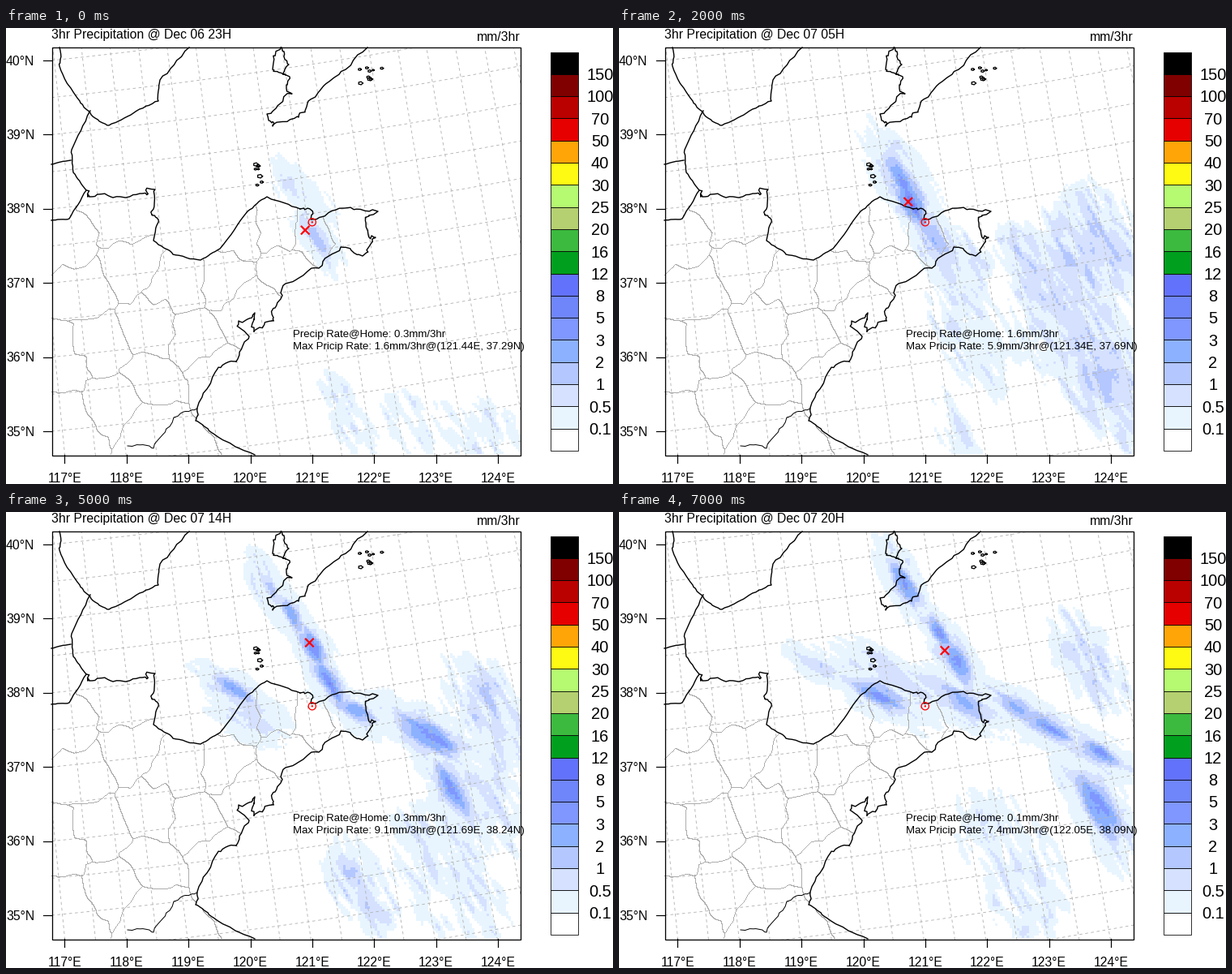
Animation of 749 by 562 pixels, one loop 8 s. Source, as a matplotlib script:

```python
import numpy as np
import matplotlib.pyplot as plt
from matplotlib.animation import FuncAnimation
from matplotlib.patches import Circle, Rectangle
from matplotlib.path import Path

W, H, DPI = 749, 562, 64
PT = 72 / DPI  # points per pixel
LEFT, TOP, RIGHT, BOTTOM = 56, 24, 635, 526
CELL = 3
plt.rcParams["font.family"] = "Liberation Sans"

SCALE = ["white", "#e8f5ff", "#d5e1ff", "#b4c7ff", "#8cb1ff", "#7f97ff",
         "#6f85fa", "#6372fa", "#00a01e", "#3cba3f", "#b4d070", "#b5fa70",
         "#fffa14", "#ffa508", "#e60000", "#bb0000", "#800000", "black"]
LIMITS = "0.1 0.5 1 2 3 5 8 12 16 20 25 30 40 50 70 100 150".split()
RGB = np.array([plt.matplotlib.colors.to_rgb(c) for c in SCALE])

# Rain cells: x, y, half length, peak colour level
RAIN_23 = [(350, 190, 38, 1.9), (380, 225, 45, 1.9), (384, 258, 38, 3.5),
           (410, 452, 32, 1.7), (430, 492, 42, 1.5), (500, 490, 44, 1.3),
           (560, 497, 42, 1.3), (605, 492, 40, 1.5)]
RAIN_05 = [(352, 192, 58, 4.8), (361, 216, 46, 6.4), (388, 262, 55, 3.7),
           (430, 280, 44, 1.9), (505, 295, 62, 2.9), (560, 285, 70, 2.9),
           (605, 265, 85, 2.9), (560, 370, 110, 2.7), (600, 430, 100, 2.7),
           (440, 380, 80, 2.1), (420, 495, 50, 1.9)]
RAIN_11 = [(332, 115, 26, 5.2), (376, 165, 44, 5.6), (396, 205, 50, 5.7),
           (430, 236, 42, 5.8), (475, 235, 50, 1.9), (410, 268, 38, 2.8),
           (492, 266, 50, 4.7), (535, 292, 66, 4.9), (575, 390, 105, 2.9),
           (588, 448, 55, 4.8), (608, 275, 85, 2.2), (436, 458, 72, 4.4),
           (262, 228, 34, 1.7), (318, 226, 34, 3.2)]
RAIN_14 = [(325, 95, 38, 3.2), (352, 125, 34, 4.8), (379, 168, 42, 5.6),
           (400, 212, 42, 5.5), (432, 246, 42, 4.7), (522, 276, 60, 5.7),
           (552, 342, 54, 5.2), (595, 245, 80, 2.6), (602, 340, 85, 2.1),
           (280, 217, 38, 4.8), (300, 250, 62, 2.5), (438, 462, 66, 2.5),
           (545, 450, 95, 1.8)]
RAIN_17 = [(345, 92, 46, 5), (386, 150, 46, 5.7), (418, 212, 48, 4.5),
           (536, 284, 54, 5.2), (578, 350, 58, 5.6), (612, 405, 50, 5.8),
           (600, 195, 55, 2.6), (530, 207, 40, 1.5), (280, 195, 40, 2.7),
           (308, 240, 48, 4), (330, 255, 68, 2.3), (430, 425, 100, 1.4),
           (510, 460, 85, 1.4)]
RAIN_20 = [(353, 88, 44, 5.3), (395, 150, 34, 5.4), (416, 184, 46, 5.5),
           (250, 192, 36, 3.1), (322, 226, 52, 5.3), (335, 203, 52, 3.1),
           (425, 236, 54, 4.2), (492, 242, 44, 4.8), (530, 266, 46, 5.3),
           (592, 296, 42, 5.1), (592, 362, 64, 5.7), (582, 185, 72, 2.5),
           (450, 375, 46, 1.8), (490, 440, 95, 1.7)]

# Time label, rain at home, peak rain, peak longitude and latitude
STEPS = [("06 23H", 0.3, 1.6, 121.44, 37.29),
         ("07 02H", 1.1, 3.7, 121.38, 37.52),
         ("07 05H", 1.6, 5.9, 121.34, 37.69),
         ("07 08H", 1.4, 8.2, 121.62, 37.64),
         ("07 11H", 0.8, 11.5, 121.90, 37.46),
         ("07 14H", 0.3, 9.1, 121.69, 38.24),
         ("07 17H", 0.2, 6.8, 121.83, 38.25),
         ("07 20H", 0.1, 7.4, 122.05, 38.09)]

# Coast corners; fine detail is added by ragged()
RIVER = [(56, 237), (78, 235), (99, 200)]
DELTA = [(99, 200), (103, 208), (132, 209), (168, 204), (184, 199), (180, 230)]
LAIZHOU = [(180, 230), (188, 236), (182, 262), (206, 279), (240, 286),
           (264, 272), (298, 226), (322, 208), (363, 223)]
CAPE = [(363, 223), (376, 236), (418, 222), (459, 226), (444, 240),
        (456, 258), (440, 281), (413, 270), (386, 296), (345, 315),
        (332, 345), (328, 361), (306, 374)]
BAY = [(306, 374), (307, 351), (287, 361), (300, 380), (284, 411)]
SOUTH = [(284, 411), (261, 420), (236, 468), (234, 484), (256, 500),
         (307, 526)]
BOHAI = [(66, 24), (66, 47), (91, 90), (107, 109), (127, 120), (157, 105),
         (188, 90), (190, 64), (226, 24)]
WEST = [(104, 102), (81, 150), (83, 178), (99, 200)]
LIAODONG = [(339, 24), (329, 51), (350, 60), (353, 81), (322, 106),
            (329, 121), (361, 110), (373, 90), (405, 61), (446, 24)]
STRAIT = [(340, 24), (349, 45), (345, 58)]
EDGE = [(56, 168), (80, 163)]
PROVINCE = [(236, 469), (207, 480), (182, 518), (150, 515)]
MAINLAND = [(RIVER, .8), (DELTA, 3), (LAIZHOU, .8), (CAPE, 2.6), (BAY, 2.4),
            (SOUTH, 1.8)]
OTHERS = [(BOHAI, 1.2), (WEST, .8), (LIAODONG, 2.4), (STRAIT, 2), (EDGE, .6)]

# Island groups: x, y, spread in x and y, count
ISLANDS = [(312, 178, 6, 16, 8), (450, 58, 14, 11, 9)]

# District centres
TOWNS = [(75, 270), (140, 240), (90, 318), (150, 288), (215, 315), (75, 410),
         (110, 395), (270, 307), (288, 256), (335, 250), (345, 295),
         (380, 255), (418, 250), (228, 385), (185, 372), (255, 430),
         (182, 432), (300, 345), (130, 460), (80, 490), (180, 490)]


def project(lon, lat):
    """Conic projection to stage pixels."""
    r = 6673.7 + 90.96 * (40 - lat)
    a = 0.145 + 0.0105 * (lon - 121.4)
    return -633.6 + r * np.sin(a), -6598 + r * np.cos(a)


def ragged(points, amp, seed, rounds=3):
    """Roughen a polyline by shifting its midpoints."""
    rng = np.random.default_rng(seed)
    p = np.array(points, float)
    for _ in range(rounds):
        out = np.empty((2 * len(p) - 1, 2))
        out[::2] = p
        out[1::2] = (p[:-1] + p[1:]) / 2 + rng.normal(0, amp, (len(p) - 1, 2))
        p, amp = out, amp / 1.5
    return p


def value_noise(u, v, rng):
    """Smooth noise in -1..1 with unit lattice spacing."""
    grid = rng.uniform(-1, 1, (128, 256))
    i, j = np.floor(u).astype(int), np.floor(v).astype(int)
    s, t = u - i, v - j

    def at(a, b):
        return grid[a % 128, b % 256]

    return ((at(i, j) * (1 - s) + at(i + 1, j) * s) * (1 - t)
            + (at(i, j + 1) * (1 - s) + at(i + 1, j + 1) * s) * t)


def wind(x, y, peak):
    """Direction in which a rain cell is drawn out."""
    inland = x < 340 and y > 150
    front = peak >= 3 and x > 420 and 225 < y < 310
    return np.radians(30 if inland or front else 60)


def cone(r, peak):
    return peak - (peak - 1) * r ** 1.5 - 4 * np.maximum(r - 1, 0)


def rain_level(cells, seed):
    rng = np.random.default_rng(seed)
    x, y = np.meshgrid(np.arange(LEFT, RIGHT, CELL) + CELL / 2,
                       np.arange(TOP, BOTTOM - 1, CELL) + CELL / 2)
    level = np.zeros(x.shape)
    for cx, cy, length, peak in cells:
        core = peak >= 3
        a = wind(cx, cy, peak)
        u = (x - cx) * np.cos(a) + (y - cy) * np.sin(a)
        v = (y - cy) * np.cos(a) - (x - cx) * np.sin(a)
        r = np.hypot(u / length, v / (length * (.36 if core else .55)))
        cell = cone(r, peak)
        if core:
            cell = np.maximum(cell, cone(r / 1.6, 2.4))
        streak = .85 if core else 1.4 if cx > 400 else .7
        cell += streak * value_noise(u / 24, v / 5, rng)
        level = np.maximum(level, cell)
    return level + rng.uniform(-.12, .12, x.shape)


def shade(level):
    return RGB[np.clip(level, 0, 7).astype(int)]


def district_image(coast):
    """Thin borders between the areas nearest to each town."""
    rng = np.random.default_rng(5)
    x, y = np.meshgrid(np.arange(W) + .5, np.arange(H) + .5)
    wx = x + 7 * value_noise(x / 14, y / 14, rng)
    wy = y + 7 * value_noise(x / 14, y / 14, rng)
    near = np.argmin([np.hypot(wx - a, wy - b) for a, b in TOWNS], axis=0)
    edge = near != np.roll(near, 1, 0)
    edge |= near != np.roll(near, 1, 1)
    land = Path(np.vstack([coast, [(LEFT, BOTTOM)]]))
    inside = land.contains_points(np.column_stack([x.ravel(), y.ravel()]))
    image = np.full((H, W, 4), .68)
    image[..., 3] = edge & inside.reshape(H, W) & (x > LEFT)
    return image


levels = [rain_level(c, 40 + k) for k, c in enumerate(
    [RAIN_23, RAIN_05, RAIN_11, RAIN_14, RAIN_17, RAIN_20])]
levels.insert(1, (levels[0] + levels[1]) / 2)
levels.insert(3, (levels[2] + levels[3]) / 2)
images = [shade(v) for v in levels]

fig = plt.figure(figsize=(W / DPI, H / DPI), dpi=DPI, facecolor="white")
ax = fig.add_axes([0, 0, 1, 1])
ax.axis("off")
rain = ax.imshow(images[0], extent=(LEFT, RIGHT, BOTTOM - 1, TOP),
                 interpolation="nearest", aspect="auto", zorder=1)

box = Rectangle((LEFT + .5, TOP - .5), RIGHT - LEFT - 1, BOTTOM - TOP + 1,
                fill=False, ec="black", lw=1.3 * PT, zorder=6)
ax.add_patch(box)


def line(x, y, color="black", width=1.0, z=3, **kw):
    item, = ax.plot(x, y, color=color, lw=width * PT, zorder=z, **kw)
    return item


def label(x, y, s, size, ha="left"):
    return ax.text(x, y, s, fontsize=size * PT, ha=ha, va="baseline", zorder=8)


# Graticule
lons, lats = np.linspace(114, 128, 60), np.linspace(33, 42, 60)
curves = [project(lon, lats) for lon in np.arange(115, 128, .5)]
curves += [project(lons, lat) for lat in np.arange(33, 42, .5)]
for gx, gy in curves:
    line(gx, gy, "#b4b4b4", .9, 2, dashes=(4, 4)).set_clip_path(box)

# Coasts, islands and borders
shores = [ragged(p, amp, k) for k, (p, amp) in enumerate(MAINLAND + OTHERS)]
for shore in shores:
    line(*shore.T, width=1.4, z=4)
line(*ragged(PROVINCE, 2, 70).T)
ax.imshow(district_image(np.vstack(shores[:len(MAINLAND)])),
          extent=(0, W, H, 0), interpolation="nearest", aspect="auto",
          zorder=2.5)
rng = np.random.default_rng(8)
turn = np.linspace(0, 2 * np.pi, 6)
for ix, iy, sx, sy, count in ISLANDS:
    for _ in range(count):
        ox, oy = ix + rng.uniform(-sx, sx), iy + rng.uniform(-sy, sy)
        r = rng.uniform(1, 3.5)
        line(ox + r * np.cos(turn), oy + .7 * r * np.sin(turn), width=1.3, z=4)

# Axis ticks
for k in range(6):
    ty = 40 + 91.4 * k
    line([46, LEFT], [ty, ty], width=1.2)
    label(0, ty + 5.7, f"{40 - k}°N", 15.7)
for k in range(8):
    tx = 72.3 + 76.4 * k
    line([tx, tx], [BOTTOM, 536], width=1.2)
    label(tx, 560.5, f"{117 + k}°E", 15.7, "center")

# Colour bar
step_h = (521 - 29.5) / len(SCALE)
for k, color in enumerate(SCALE):
    ax.add_patch(Rectangle((671.5, 521 - step_h * (k + 1)), 34.5, step_h,
                           fc=color, ec="black", lw=.8 * PT, zorder=3))
for k, s in enumerate(LIMITS):
    label(733, 521 - step_h * (k + 1) + 7.3, s, 20, "center")

title = label(56, 12.5, "", 15.8)
label(635, 16, "mm/3hr", 15.7, "right")
home_text = label(354, 381.5, "", 13.2)
peak_text = label(354, 396, "", 13.2)

home_at = (377.8, 239.3)
ax.add_patch(Circle(home_at, 4.6, fill=False, ec="red", lw=1.3 * PT, zorder=7))
ax.add_patch(Circle(home_at, 1.2, fc="red", ec="none", zorder=7))
cross = [line([], [], "red", 2.2, 7) for _ in range(2)]
ax.set_xlim(0, W)
ax.set_ylim(H, 0)


def draw(k):
    when, home, peak, lon, lat = STEPS[k]
    rain.set_data(images[k])
    title.set_text(f"3hr Precipitation @ Dec {when}")
    home_text.set_text(f"Precip Rate@Home: {home:.1f}mm/3hr")
    peak_text.set_text(
        f"Max Pricip Rate: {peak:.1f}mm/3hr@({lon:.2f}E, {lat:.2f}N)")
    px, py = project(lon, lat)
    for arm, sign in zip(cross, (1, -1)):
        arm.set_data([px - 4.5, px + 4.5], [py - 4.5 * sign, py + 4.5 * sign])
    return [rain, title, home_text, peak_text, *cross]


anim = FuncAnimation(fig, draw, frames=len(STEPS), interval=1000,
                     repeat=True, repeat_delay=0, blit=False)
plt.show()
```
